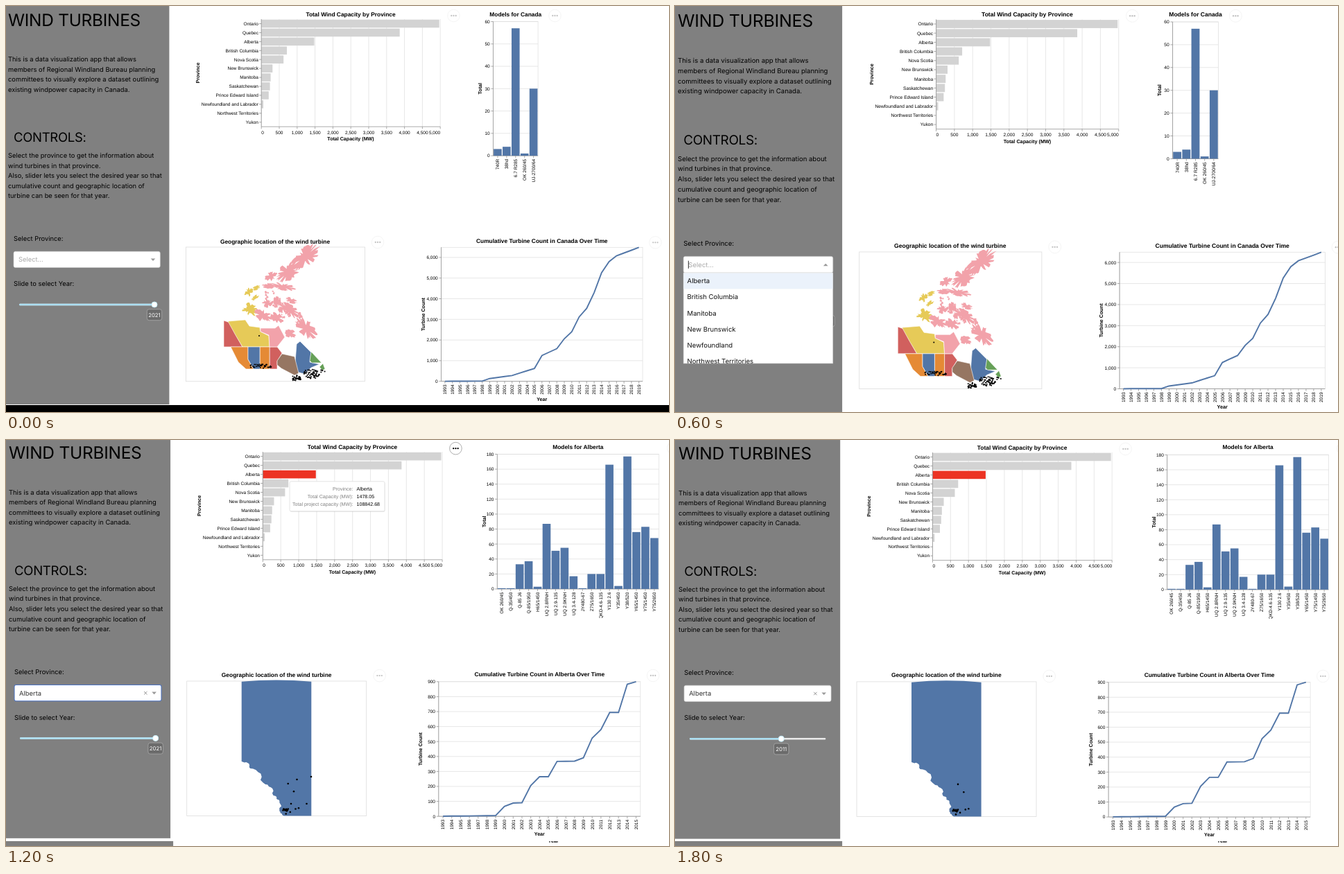
An HTML page for the animation above (2.4 s loop, 956x586 px).

```html
<!DOCTYPE html>
<html lang="en">
<head>
<meta charset="utf-8">
<title>Wind turbines dashboard</title>
<style>
html, body { margin: 0; width: 100%; height: 100%; overflow: hidden; background: #fff; }
svg { display: block; width: 956px; height: 586px; text-rendering: geometricPrecision; }
.ui { font-family: Inter, "Open Sans", sans-serif; }
.chart { font-family: "Liberation Sans", Arial, sans-serif; }
</style>
</head>
<body>
<svg id="stage" viewBox="0 0 956 586" xmlns="http://www.w3.org/2000/svg"></svg>
<script>
const BLUE = '#5276a7', PINK = '#f2a2aa', YELLOW = '#e6ca58', RED = '#d1605e',
  ORANGE = '#e58a35', BROWN = '#967662', GREEN = '#66a058';
const LOOP = 2400, STEP = 600;

// ---------- drawing helpers ----------
const attrs = o => Object.entries(o).map(([k, v]) => ` ${k}="${v}"`).join('');
const rect = (x, y, w, h, fill, o = {}) =>
  `<rect x="${x}" y="${y}" width="${w}" height="${h}" fill="${fill}"${attrs(o)}/>`;
const line = (x1, y1, x2, y2, stroke = '#ddd', w = .7) =>
  `<line x1="${x1}" y1="${y1}" x2="${x2}" y2="${y2}" stroke="${stroke}" stroke-width="${w}"/>`;
const circle = (x, y, r, fill, o = {}) =>
  `<circle cx="${x}" cy="${y}" r="${r}" fill="${fill}"${attrs(o)}/>`;
const path = (d, fill, o = {}) => `<path d="${d}" fill="${fill}"${attrs(o)}/>`;
const group = (body, o = {}) => `<g${attrs(o)}>${body}</g>`;
const upright = (body, x, y) => group(body, { transform: `translate(${x} ${y}) rotate(-90)` });

// y is the middle of the capitals
const text = (s, x, y, size, o = {}) =>
  `<text x="${x}" y="${y + size * .36}" font-size="${size}"${attrs(o)}>${s}</text>`;
const label = (s, x, y, anchor = 'middle') => text(s, x, y, 6.5, { 'text-anchor': anchor });
const bold = (s, x, y, size = 7.1) =>
  text(s, x, y, size, { 'text-anchor': 'middle', 'font-weight': 700 });
const title = (s, x, y) => bold(s, x, y, 8.39);

const number = v => v.toLocaleString('en-US');
const range = (n, f) => Array.from({ length: n }, (_, i) => f(i));
const points = s => s.split(' ').map(p => p.split(',').map(Number));
const shape = pts => 'M' + pts.map(p => p.map(v => v.toFixed(1)).join(' ')).join('L');

function random(seed) {
  return () => (seed = seed * 16807 % 2147483647) / 2147483647;
}

function menuDots(x, y, active) {
  return circle(x, y, 8.8, '#fff', { stroke: active ? '#999' : '#f2f2f2', 'stroke-width': .8 }) +
    [-3.2, 0, 3.2].map(d => circle(x + d, y, 1.15, active ? '#000' : '#c4c4c4')).join('');
}

// ---------- charts ----------
function valueAxis({ x, y, w, h, max, step }) {
  let out = rect(x, y, w, h, 'none', { stroke: '#ddd', 'stroke-width': .7 });
  for (let v = 0; v <= max; v += step) {
    const ty = y + h - v / max * h;
    out += line(x, ty, x + w, ty) + line(x - 3.2, ty, x, ty, '#888') +
      label(number(v), x - 4.8, ty, 'end');
  }
  return out + line(x, y, x, y + h, '#888') + line(x, y + h, x + w, y + h, '#888');
}

const nameTick = (s, x, y) => line(x, y, x, y + 3.2, '#888') + upright(label(s, 0, 0, 'end'), x, y + 4.7);

const capacity = {
  'Ontario': 4971, 'Quebec': 3866, 'Alberta': 1478, 'British Columbia': 713,
  'Nova Scotia': 620, 'New Brunswick': 312, 'Manitoba': 260, 'Saskatchewan': 240,
  'Prince Edward Island': 205, 'Newfoundland and Labrador': 55,
  'Northwest Territories': 9, 'Yukon': 1
};

function capacityChart(selected, active) {
  const x = 368.2, y = 19, w = 258, h = 155.2, row = h / 12, max = 5000;
  let out = title('Total Wind Capacity by Province', 497, 12);
  for (let v = 0; v <= max; v += 500) {
    const tx = x + v / max * w;
    out += line(tx, y, tx, y + h) + line(tx, y + h, tx, y + h + 3.2, '#888') +
      label(number(v), tx, 182.3, v === 0 ? 'start' : v === max ? 'end' : 'middle');
  }
  Object.entries(capacity).forEach(([name, v], i) => {
    const cy = y + row * (i + .5);
    out += rect(x, cy - 5.8, v / max * w, 11.6, name === selected ? '#ec3323' : '#d3d3d3') +
      line(x - 3.2, cy, x, cy, '#888') + label(name, x - 4.3, cy, 'end');
  });
  return out + line(x, y, x, y + h, '#888') + line(x, y + h, x + w, y + h, '#888') +
    bold('Total Capacity (MW)', 497, 191.5) + upright(bold('Province', 0, 0), 276.5, 96.5) +
    menuDots(645.5, 14, active);
}

function modelChart(c) {
  const bars = c.bars.split(', '), slot = c.w / bars.length, base = c.y + c.h;
  let out = valueAxis(c) + title('Models for ' + c.place, c.x + c.w / 2, c.titleY);
  bars.forEach((bar, i) => {
    const [name, v] = bar.split(': '), x = c.x + slot * i, h = v / c.max * c.h;
    out += rect(x + .65, base - h, slot - 1.3, h, BLUE) + nameTick(name, x + slot / 2, base);
  });
  return group(out, { 'clip-path': 'url(#labels)' }) +
    upright(bold('Total', 0, 0), c.x - 19, c.y + c.h / 2) + menuDots(c.dotsX, c.titleY + 2);
}

// Straight runs between a few [year, count] pairs
function countAt(keys, year) {
  const i = Math.max(1, keys.findIndex(k => k[0] >= year));
  const [[y0, v0], [y1, v1]] = [keys[i - 1], keys[i]];
  return v0 + (v1 - v0) * (year - y0) / (y1 - y0);
}

function timeChart(c) {
  const keys = points(c.counts), first = keys[0][0], n = keys[keys.length - 1][0] - first + 1;
  const slot = c.w / n, base = c.y + c.h, mid = c.x + c.w / 2;
  const px = i => c.x + slot * (i + .5);
  const curve = range(n, i => [px(i), base - countAt(keys, first + i) / c.max * c.h]);
  return valueAxis(c) + title(`Cumulative Turbine Count in ${c.place} Over Time`, mid, c.titleY) +
    range(n, i => nameTick(first + i, px(i), base)).join('') +
    path(shape(curve), 'none', { stroke: BLUE, 'stroke-width': 1.9 }) +
    upright(bold('Turbine Count', 0, 0), c.x - 26, c.y + c.h / 2) +
    bold('Year', mid, base + 25.3) + menuDots(c.dotsX, c.titleY + 2);
}

const canadaModels = {
  place: 'Canada', x: 702.5, y: 22.5, w: 64.6, h: 193.6, max: 60, step: 10, titleY: 12, dotsX: 791.5,
  bars: '740R: 3, 38hd: 4, 6.7 R285: 57, OK 260/45: 1, UJ-2700/64: 30'
};
const albertaModels = {
  place: 'Alberta', x: 708.3, y: 20.5, w: 233, h: 194.5, max: 180, step: 20, titleY: 9.5, dotsX: 962,
  bars: 'OK 260/45: 1, Q-35/450: 1, Q-85 J6: 33, Q-85/1950: 37, H65/1450: 3, UQ 2.8RNH: 87, ' +
    'UQ 2.9-135: 51, UQ 2.9KNH: 55, UQ 3.4-128: 17, JY480-67: 1, Z75/1650: 20, QKD-4.6-135: 20, ' +
    'Y130 2.6: 166, Y35/450: 4, Y38/520: 177, Y65/1450: 76, Y75/1450: 83, Y75/2650: 68'
};
const canadaTime = {
  place: 'Canada', x: 627.5, y: 348.3, w: 290.5, h: 193.4, max: 6490, step: 1000,
  titleY: 339.3, dotsX: 936.3,
  counts: '1993,5 1998,10 1999,135 2002,280 2005,625 2006,1250 2008,1580 2009,2060 2010,2400 ' +
    '2011,3120 2012,3530 2013,4300 2014,5260 2015,5800 2016,6080 2019,6485'
};
const albertaTime = {
  place: 'Alberta', x: 623.8, y: 348.8, w: 291, h: 194.4, max: 900, step: 100,
  titleY: 338, dotsX: 933,
  counts: '1993,1 1999,5 2000,66 2001,89 2002,91 2003,205 2004,265 2005,265 2006,367 2008,369 ' +
    '2009,391 2010,523 2011,580 2012,694 2013,694 2014,883 2015,900'
};

// ---------- maps ----------
const provinces = {
  [RED]: ['314,454 323,457 329,470 341,492 314,492', '380,492 391,492 398,501 391,513 391,524 380,524'],
  [YELLOW]: ['320,455 345,453 351,462 366,464 367,470 379,476 380,492 341,492 331,475'],
  [PINK]: ['367,465 388,465 393,461 402,478 391,492 380,492 379,475 367,470'],
  [ORANGE]: ['324,492 349,492 349,510 357,524 346,524 335,514', '366,492 380,492 380,524 366,524'],
  [BLUE]: ['349,492 366,492 366,524 357,524 349,510',
    '419,488 424,484 440,500 438,514 452,517 440,522 430,531 419,528 417,514'],
  [BROWN]: ['398,502 416,506 422,530 416,533 397,523 391,518 391,512'],
  [GREEN]: ['440,499 455,515 441,515 438,512', '452,521 457,516 460,524 456,526']
};
// Islands: centre x, centre y, half length, half width, turn in degrees
const islands = {
  [YELLOW]: '352,438,12,9,20 350,413,7,5,-50 361,407,6,3,-20 359,421,7,3,-40',
  [PINK]: '432,362,24,12,-42 407,383,19,11,-38 382,390,9,6,-30 399,405,18,5,10 378,404,9,4,0 ' +
    '391,427,8,5,70 377,429,7,6,0 371,447,13,9,25 408,438,18,8,35 433,466,19,10,50 ' +
    '391,450,10,7,30 410,473,8,6,20 411,425,9,4,20'
};
// x, y, half width, half height, number of turbines
const farms = '368,520,20,3,36 418,537,8,4,36 440,531,12,7,60 454,527,9,2,9 365,476,0,0,1';

// Ragged ellipse whose edge is cut by narrow inlets
function island([x, y, rx, ry, deg], rnd) {
  const n = Math.round(12 + rx * 2), a = deg * Math.PI / 180;
  return shape(range(n, i => {
    const t = i / n * 2 * Math.PI, r = rnd() < .3 ? .35 + rnd() * .4 : .85 + rnd() * .3;
    const u = Math.cos(t) * rx * r, v = Math.sin(t) * ry * r;
    return [x + u * Math.cos(a) - v * Math.sin(a), y + u * Math.sin(a) + v * Math.cos(a)];
  })) + 'Z';
}

// Splits every run in two and pushes the new point sideways
function roughen(pts, rnd, amount, rounds) {
  for (let k = 0; k < rounds; k++) pts = pts.flatMap(([x, y], i) => {
    if (!pts[i + 1]) return [[x, y]];
    const [u, v] = pts[i + 1], d = (rnd() - .5) * amount;
    return [[x, y], [(x + u) / 2 - (v - y) * d, (y + v) / 2 + (u - x) * d]];
  });
  return pts;
}

const mapFrame = (x, y, w, h) => rect(x, y, w, h, '#fff', { stroke: '#ddd', 'stroke-width': .8 });

function canadaMap() {
  const rnd = random(4211), edge = { stroke: '#fff', 'stroke-width': .6, 'stroke-linejoin': 'round' };
  let out = mapFrame(259.5, 348, 258, 193.8);
  for (const [fill, list] of Object.entries(islands))
    for (const spot of points(list)) out += path(island(spot, rnd), fill);
  for (let i = 0; i < 40; i++) {
    const t = rnd(), size = 1 + rnd() * 2;
    out += path(island([366 + t * 50 + rnd() * 16, 408 + t * 34 + rnd() * 22, size, size, 0], rnd), PINK);
  }
  for (const [fill, list] of Object.entries(provinces))
    for (const s of list) out += path(shape(points(s)) + 'Z', fill, edge);
  for (const [x, y, rx, ry, n] of points(farms)) out += range(n, () => {
    const a = rnd() * 2 * Math.PI, r = Math.sqrt(rnd());
    return circle((x + Math.cos(a) * r * rx).toFixed(1), (y + Math.sin(a) * r * ry).toFixed(1), 1, '#000');
  }).join('');
  return out;
}

function albertaMap(year) {
  const rnd = random(77);
  const foothills = points('339.7,464 352,474 374,497 389,514 396,526 394,532 401,542.5');
  const border = shape(roughen(foothills, rnd, .5, 3));
  const sites = points('406.7,496 415,507.3 422,531.3 417.5,532.5 409.8,537 403.7,539.5');
  if (year > 2011) sites.push(...points('440,486 419.5,490 411,525 433.5,525'));
  const cluster = range(9, i => [399.5 + i * .9, 534 + (rnd() - .5) * 3]);
  return mapFrame(260.7, 348, 259, 194.6) +
    path(border + 'H440.3V348.8Q390 344 339.7 348.8Z', BLUE) +
    [...sites, ...cluster].map(([x, y]) => circle(x, y, 1.3, '#000')).join('');
}

// ---------- sidebar ----------
const intro = ['This is a data visualization app that allows',
  'members of Regional Windland Bureau planning',
  'committees to visually explore a dataset outlining',
  'existing windpower capacity in Canada.'];
const help = ['Select the province to get the information about',
  'wind turbines in that province.',
  'Also, slider lets you select the desired year so that',
  'cumulative count and geographic location of',
  'turbine can be seen for that year.'];
const options = Object.keys(capacity).sort().slice(0, 6).map(s => s.split(' and')[0]);
const body = (s, x, y, fill = '#000') => text(s, x, y, 9.35, { fill });

function slider(year) {
  const x = year === 2021 ? 214 : 150.7;
  return rect(19, 429.8, 195.5, 2.5, '#e9e9e9', { rx: 1.2 }) +
    rect(19, 429.8, x - 19, 2.5, '#abdff2', { rx: 1.2 }) +
    circle(x, 431, 4, '#fff', { stroke: '#c4eaf6', 'stroke-width': 1 }) +
    rect(x - 10.7, 437.7, 21.4, 16, '#6b6b6b', { rx: 3, stroke: '#a4a4a4', 'stroke-width': .9 }) +
    text(year, x, 445.8, 7.8, { fill: '#fff', 'text-anchor': 'middle' });
}

function dropdown({ value, open, focus }) {
  let out = rect(11, 354.3, 211.3, 23.2, '#fff',
    { rx: 2.5, stroke: focus ? '#4a72c4' : '#ccc', 'stroke-width': focus ? 1 : .6 });
  out += body(value || 'Select...', 18, 366, value ? '#333' : '#aaa');
  out += path(open ? 'M208.7 368H215.3L212 364.4Z' : 'M208.7 364.4H215.3L212 368Z', '#999');
  if (value) out += path('M197.5 363.8l4.4 4.4m0 -4.4l-4.4 4.4', 'none', { stroke: '#888', 'stroke-width': .9 });
  if (open) {
    out += line(18, 360.5, 18, 371.5, '#222', .9) +
      rect(11, 377.5, 211.3, 128.3, '#fff', { stroke: '#ccc', 'stroke-width': .6 }) +
      rect(11.3, 378, 210.7, 22.4, '#ebf2fb') +
      group(options.map((s, i) => body(s, 16.3, 389.2 + i * 22.6, '#111')).join(''),
        { 'clip-path': 'url(#menu)' });
  }
  return out;
}

function sidebar(state) {
  const lines = (list, y) => list.map((s, i) => body(s, 3, y + i * 14.5)).join('');
  return group(rect(-3, -3, 238.4, 578, '#808080') +
    text('WIND TURBINES', 3, 20.4, 24.4, { 'letter-spacing': -.25 }) + lines(intro, 77) +
    text('CONTROLS:', 11, 189.4, 18.5, { 'letter-spacing': -.3 }) + lines(help, 215.8) +
    body('Select Province:', 11, 335.6) + body('Slide to select Year:', 11, 401) +
    slider(state.year) + dropdown(state), { class: 'ui' });
}

function tooltip() {
  const rows = { 'Province:': 'Alberta', 'Total Capacity (MW):': '1478.05',
    'Total project capacity (MW):': '108842.68' };
  return rect(409.7, 61, 137, 43, '#000', { rx: 2, opacity: .08 }) +
    rect(409, 59.8, 137, 43, '#fff', { rx: 2, stroke: '#ddd', 'stroke-width': .8 }) +
    Object.entries(rows).map(([k, v], i) =>
      text(k, 500.5, 70.7 + i * 10.9, 7.1, { fill: '#808080', 'text-anchor': 'end' }) +
      text(v, 505.5, 70.7 + i * 10.9, 7.1)).join('');
}

// ---------- scenes ----------
function page(state, transform) {
  const charts = capacityChart(state.value, state.hover) +
    title('Geographic location of the wind turbine', 388, 339.5) + menuDots(536, 341) +
    (state.value ? '' : modelChart(canadaModels) + canadaMap() + timeChart(canadaTime));
  return group(sidebar(state) + group(charts, { class: 'chart' }), { transform });
}

function albertaScene(state, pageAt, shift) {
  const charts = modelChart(albertaModels) + albertaMap(state.year) + timeChart(albertaTime);
  return group(rect(0, 0, 956, 579, '#fff') + page(state, pageAt) +
    group(charts + (state.hover ? tooltip() : ''), { class: 'chart', transform: shift }),
    { 'clip-path': 'url(#upper)' });
}

const scenes = [
  page({ year: 2021 }, 'translate(0 0)') + rect(0, 576, 956, 10, '#000'),
  page({ year: 2021, open: true }, 'translate(1 0) scale(1.02)'),
  albertaScene({ year: 2021, value: 'Alberta', focus: true, hover: true },
    'translate(1 -1.9) scale(1.003)', 'translate(0 0)'),
  albertaScene({ year: 2011, value: 'Alberta' }, 'translate(2.1 -1.1) scale(1.003)', 'translate(1.3 .9)')
];

const clip = (id, x, y, w, h) => `<clipPath id="${id}">${rect(x, y, w, h, '#000')}</clipPath>`;
const stage = document.getElementById('stage');
stage.innerHTML = `<defs>${clip('upper', 0, 0, 956, 579)}${clip('menu', 11, 377, 211, 128.6)}` +
  `${clip('labels', 600, 0, 400, 257)}</defs>` + rect(0, 0, 956, 586, '#fff') +
  scenes.map(s => group(s)).join('');
const layers = [...stage.children].slice(2);

// The open-menu page stays underneath the two later views
const visible = [[0], [1], [1, 2], [1, 3]];
let shown = -1;
const start = performance.now();

function draw(now) {
  const step = Math.floor(Math.max(0, now - start) % LOOP / STEP);
  if (step !== shown) {
    layers.forEach((g, i) => g.style.display = visible[step].includes(i) ? '' : 'none');
    shown = step;
  }
  requestAnimationFrame(draw);
}
draw(start);
</script>
</body>
</html>
```
